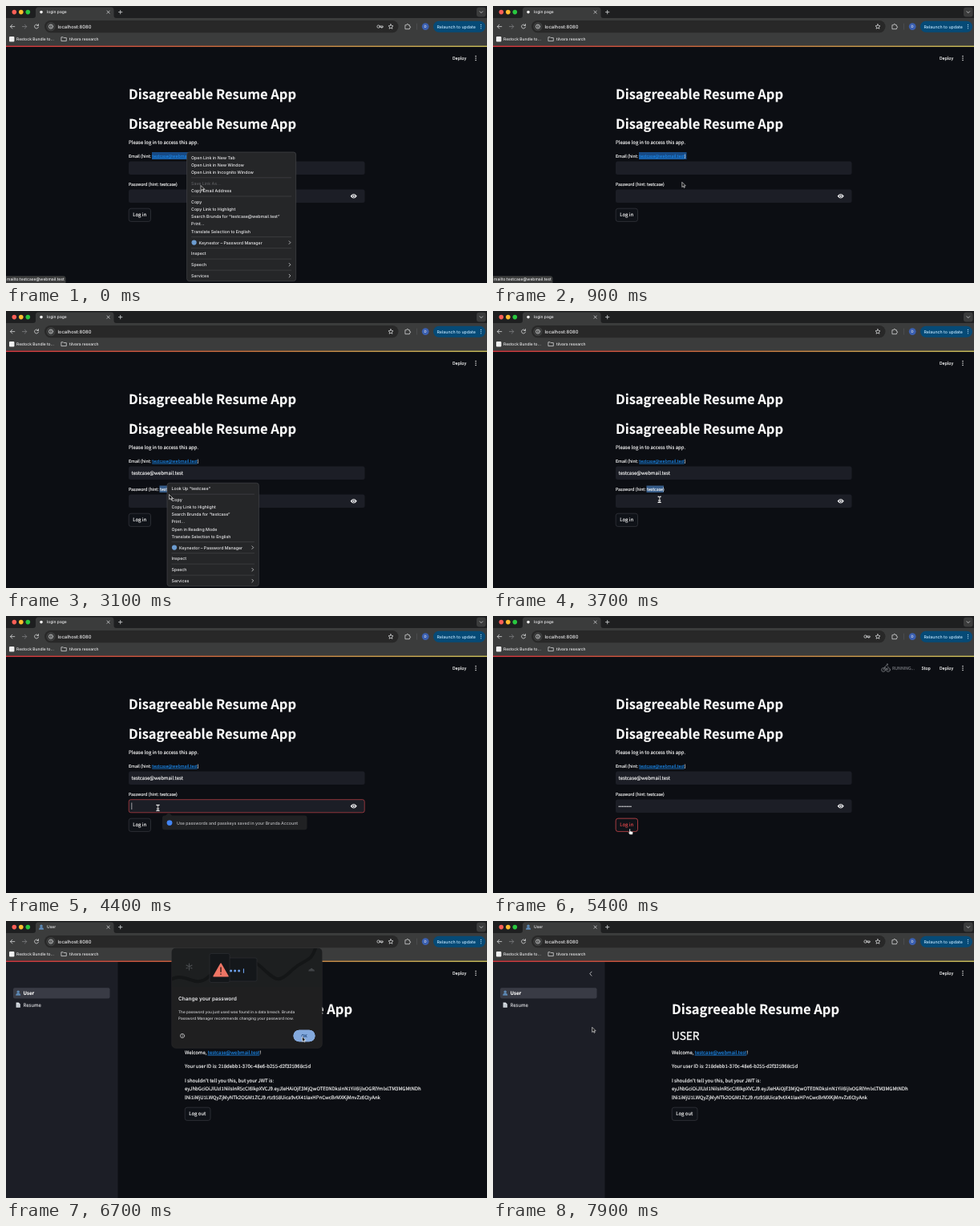
Recreate the animation shown at these times as an HTML page. Size 600 px wide and 345 px high, loop 8 s.

```html
<!DOCTYPE html>
<html lang="en">
<head>
<meta charset="utf-8">
<title>Login demo</title>
<style>
html, body { margin: 0; width: 100%; height: 100%; overflow: hidden; background: #0c0e13; }
svg { display: block; width: 600px; height: 345px; }
text { font: 500 5.25px Inter, sans-serif; color: #ececee; fill: currentColor; white-space: pre; text-rendering: geometricPrecision; }
.app text { font: 6.01px "Noto Sans CJK JP", "Noto Sans CJK SC", "Noto Sans CJK", sans-serif; color: #fafafa; stroke: currentColor; stroke-width: .14; }
.app .title { font-size: 16.45px; font-weight: 700; }
.app .sub { font-size: 13.6px; stroke-width: .4; }
.app .small { font-size: 5.25px; }
.app .note { font-size: 4.4px; color: #94959b; }
.app .link { color: #1c83e1; text-decoration: underline; }
.tab { font-size: 4.95px; }
.line { fill: none; stroke: #d2d3d5; stroke-width: .8; stroke-linecap: round; stroke-linejoin: round; }
.field { fill: #1c1e26; }
.focus { fill: none; stroke: #c23f47; stroke-width: .7; }
.button { fill: #0f1218; stroke: #383a41; stroke-width: .7; }
.caret { stroke: #f6f6f8; stroke-width: .6; }
</style>
</head>
<body>
<svg viewBox="0 0 600 345">
  <defs>
    <linearGradient id="stripe"><stop stop-color="#e23c44"/><stop offset=".5" stop-color="#d67a42"/><stop offset="1" stop-color="#d6cb62"/></linearGradient>
    <clipPath id="banner"><path d="M207 82V39q0-5 5-5H389q5 0 5 5V82z"/></clipPath>
    <g id="person"><circle r="1.7" cy="-1.3"/><path d="M-3 3.2q0-3 3-3t3 3z"/></g>
  </defs>

  <!-- Page -->
  <rect width="600" height="345" fill="#0c0e13"/>
  <g class="app">
    <text class="small" x="557" y="67">Deploy</text>
    <g fill="#eee"><circle cx="586" cy="62.6" r=".75"/><circle cx="586" cy="65.1" r=".75"/><circle cx="586" cy="67.6" r=".75"/></g>
    <g data-on="5300-5600">
      <g class="line" style="stroke:#7d7f84">
        <circle cx="487" cy="67" r="2.4"/><circle cx="493" cy="67" r="2.4"/>
        <path d="M487 67l1.7-3.5 2.2 2.6 2.1.9M488.7 63.5l2.3-2.2 2 2"/><circle cx="491.8" cy="60.2" r=".6"/>
      </g>
      <text class="small" x="498" y="67" style="color:#77797f">RUNNING...</text>
      <text class="small" x="534.5" y="67">Stop</text>
    </g>

    <g data-on="0-5600">
      <text class="title" x="153" y="115.7">Disagreeable Resume App</text>
      <text class="title" x="153" y="152.9">Disagreeable Resume App</text>
      <text x="153" y="171.7">Please log in to access this app.</text>
      <rect data-on="0-1300" x="182" y="182" width="59.5" height="9" fill="#174a85"/>
      <text class="small" x="153" y="188.8">Email (hint: <tspan class="link">testcase@webmail.test</tspan>)</text>
      <rect class="field" x="153" y="193.5" width="294.5" height="16.5" rx="2.5"/>
      <g data-on="1300-2400">
        <rect class="focus" x="153.2" y="193.7" width="294" height="16.1" rx="2.5"/>
        <path class="caret" data-on="1300-1500" d="M156.8 197.5v8.5"/>
        <path class="caret" data-on="1500-2400" d="M223.6 197.5v8.5"/>
        <text class="note" data-on="1500-2400" x="444.5" y="207.6" text-anchor="end">Press Enter to apply</text>
      </g>
      <text data-on="1500-5600" x="156.5" y="204">testcase@webmail.test</text>
      <rect data-on="2500-4000" x="191.5" y="217.5" width="21.5" height="8.6" fill="#355b88"/>
      <text class="small" x="153" y="223.9">Password (hint: testcase)</text>
      <rect class="field" x="153" y="228.5" width="294.5" height="16.5" rx="2.5"/>
      <g data-on="4000-5200">
        <rect class="focus" x="153.2" y="228.7" width="294" height="16.1" rx="2.5"/>
        <path class="caret" data-on="4000-4700" d="M156.8 232.5v8.5"/>
        <path class="caret" data-on="4700-5200" d="M173.6 232.5v8.5"/>
      </g>
      <path data-on="4700-5600" d="M157.4 237.2h15" fill="none" stroke="#f6f6f8" stroke-width="1.6" stroke-linecap="round" stroke-dasharray="0 2.08"/>
      <path d="M429.6 236.8q4.1-5.6 8.2 0-4.1 5.6-8.2 0z" fill="#f4f4f6"/>
      <circle cx="433.7" cy="236.8" r="1.5" fill="#f4f4f6" stroke="#1c1e26" stroke-width=".8"/>
      <rect class="button" x="153.2" y="252.2" width="27.3" height="16.2" rx="2.7"/>
      <text x="158.3" y="262.4">Log in</text>
      <g data-on="5000-5600">
        <rect class="button" x="153.2" y="252.2" width="27.3" height="16.2" rx="2.7" style="stroke:#dc4549"/>
        <text x="158.3" y="262.4" style="color:#e2484b">Log in</text>
      </g>
    </g>

    <g data-on="5600-8000">
      <rect y="51" width="139.5" height="294" fill="#1c1e26"/>
      <rect x="9" y="83.2" width="120.5" height="13.4" rx="2" fill="#393b45"/>
      <use href="#person" x="15.2" y="89.6" fill="#5d88b4"/>
      <text x="21.5" y="92" style="font-weight:700">User</text>
      <path d="M12.6 101.4h3.2l2 2v4.4h-5.2z" fill="#d7dce2"/><path d="M13.6 104.6h3M13.6 106.2h3" stroke="#8a929c" stroke-width=".5"/>
      <text x="21.5" y="107.2" style="color:#cfd0d4">Resume</text>
      <path class="line" data-on="7700-8000" d="M123 63.2l-2.2 2.5 2.2 2.5"/>
      <text class="title" x="223" y="115.7">Disagreeable Resume App</text>
      <text class="sub" x="223" y="148.4">USER</text>
      <text x="223" y="165.8">Welcome, <tspan class="link">testcase@webmail.test</tspan>!</text>
      <text x="223" y="183.3">Your user ID is: 218debb1-370c-48e6-b255-d2f325968c5d</text>
      <text x="223" y="200.7">I shouldn't tell you this, but your JWT is:</text>
      <text x="223" y="211.4">eyJhbGciOiJIUzI1NiIsInR5cCI6IkpXVCJ9.eyJleHAiOjE3MjQwOTE0NDksInN1YiI6IjIxOGRlYmIxLTM3MGMtNDh</text>
      <text x="223" y="221.9">lNi1iMjU1LWQyZjMyNTk2OGM1ZCJ9.rtz958Uica9vtX41IaxHPnCwcBrMXKjMnvZz6CtyAnk</text>
      <rect class="button" x="223.2" y="232.2" width="31.8" height="16.2" rx="2.7"/>
      <text x="228.3" y="242.4">Log out</text>
    </g>
  </g>

  <!-- Browser frame -->
  <rect width="600" height="15" fill="#1e1f20"/>
  <path d="M0 15H34q3 0 3-3V5q0-3.5 3.5-3.5H131q3.5 0 3.5 3.5v7q0 3 3 3H600V49.5H0z" fill="#3b3c3c"/>
  <rect y="49.5" width="600" height="1.4" fill="url(#stripe)"/>
  <circle cx="10.3" cy="7.6" r="2.8" fill="#ff5f57"/><circle cx="18.8" cy="7.6" r="2.8" fill="#febc2e"/><circle cx="27.3" cy="7.6" r="2.8" fill="#28c840"/>
  <g data-on="0-5600"><circle cx="44" cy="7.6" r="1.8" fill="#f2f2f2"/><text class="tab" x="51" y="9.4">login page</text></g>
  <g data-on="5600-8000"><use href="#person" x="44" y="7.6" fill="#5d88b4"/><text class="tab" x="51" y="9.4">User</text></g>
  <rect x="587" y="1.8" width="11.6" height="11.6" rx="3" fill="#3b3c3c"/>
  <path class="line" d="M126 6l3.2 3.2M129.2 6L126 9.2M142.7 5.4v4.4M140.5 7.6h4.4M591 6.8l1.8 1.8 1.8-1.8"/>
  <rect x="48" y="18" width="441.5" height="15.2" rx="7.6" fill="#282828"/>
  <circle cx="56" cy="25.6" r="5.7" fill="#3b3c3c"/>
  <g class="line">
    <path d="M10.8 25.6H5.4M7.8 23.2l-2.4 2.4 2.4 2.4"/>
    <path d="M20.4 25.6h5.4M23.4 23.2l2.4 2.4-2.4 2.4" stroke="#7d7e80"/>
    <path d="M40.2 24.2a2.5 2.5 0 1 0 .3 2M40.5 22.6v1.9h-1.9"/>
    <circle cx="56" cy="25.6" r="2.5"/><path d="M56 25.5v1.2M56 24.3v.1"/>
    <path d="M480 22.7l.9 1.9 2.1.2-1.6 1.4.5 2.1-1.9-1.1-1.9 1.1.5-2.1-1.6-1.4 2.1-.2z"/>
    <path d="M498.3 23.7h1.5q-.1-1.3 1-1.3t1 1.3h1.6v1.6q1.2 0 1.2 1t-1.2 1v1.4h-5.1z"/>
    <path d="M512.5 22v7.2" stroke="#57585a" stroke-width=".6"/>
    <g data-on="0-600 5300-8000"><circle cx="464.6" cy="25.6" r="1.7"/><path d="M466.4 25h3.8v1.4h-3.8M468.8 26.6v.9"/></g>
  </g>
  <text x="64.4" y="27.7" style="font-size:5.85px">localhost:8080</text>
  <circle cx="523.2" cy="25.6" r="4.4" fill="#3a5fb0"/><text x="523.2" y="27.2" text-anchor="middle" style="font-size:4.4px">D</text>
  <rect x="533" y="18.7" width="65" height="14" rx="7" fill="#064a76"/>
  <text x="537.5" y="27.5" style="color:#c2e7ff">Relaunch to update</text>
  <g fill="#c2e7ff"><circle cx="592.5" cy="23.4" r=".6"/><circle cx="592.5" cy="25.6" r=".6"/><circle cx="592.5" cy="27.8" r=".6"/></g>
  <rect x="4" y="38" width="6.4" height="6.4" rx="1" fill="#f0f0f0"/>
  <text class="tab" x="13" y="42.8">Restock Bundle to...</text>
  <path class="line" d="M69.3 38.8h2l.8.8h3.2v4h-6z"/>
  <text class="tab" x="79" y="42.8">tilvara research</text>

  <g data-on="0-1100">
    <path d="M0 336.3H71.5q3 0 3 3V345H0z" fill="#3b3c3c"/>
    <text x="1" y="342.2" style="font-size:5px">mailto:testcase@webmail.test</text>
  </g>

  <g id="linkMenu" data-on="0-600"></g>
  <g id="textMenu" data-on="2800-3500"></g>

  <g data-on="4100-4700">
    <path d="M199 248.5l4-3.6 4 3.6H372.5q3 0 3 3v11.8q0 3-3 3H198q-3 0-3-3v-11.8q0-3 3-3z" fill="#202123"/>
    <circle cx="204" cy="257.6" r="3.4" fill="#4285f4"/>
    <text x="213" y="259.5" style="color:#b9babd">Use passwords and passkeys saved in your Brunda Account</text>
  </g>

  <!-- Password warning -->
  <g data-on="6000-6900">
    <rect x="206.7" y="33.7" width="187.6" height="124.6" rx="5" fill="#1f1f20" stroke="#2e2f31" stroke-width=".5"/>
    <g clip-path="url(#banner)">
      <rect x="207" y="34" width="187" height="48" fill="#1d1f20"/>
      <path d="M200 77C222 58 234 86 252 70S298 38 318 57s22 20 39 4 23-7 30-30" fill="none" stroke="#141617" stroke-width="4"/>
      <g fill="#14171a" stroke="#34373a" stroke-width=".5">
        <rect x="277" y="46" width="36" height="29" rx="2"/>
        <rect x="254" y="40.5" width="25" height="36" rx="2"/>
      </g>
      <path d="M268 53.2l9 15.6h-18z" fill="#ee7565" stroke="#ee7565" stroke-width="1.5" stroke-linejoin="round"/>
      <path d="M268 58v5.2M268 66v.2" stroke="#2a1715" stroke-width="1.4" stroke-linecap="round"/>
      <g fill="#6ea2ee"><circle cx="280.6" cy="62" r="1.5"/><circle cx="285.6" cy="62" r="1.5"/><circle cx="290.6" cy="62" r="1.5"/><rect x="295.9" y="59.4" width="1.1" height="5.4"/></g>
      <path class="line" d="M228.5 53v8M225 55l7 4M232 55l-7 4" style="stroke:#4a4d50;stroke-width:1.1"/>
      <path d="M377.3 62.5q0-2.7 2.2-2.5 1.6-2.4 3.3 0 2.2-.1 2.2 2.5z" fill="#424548"/>
    </g>
    <text x="215" y="99.4" style="font-size:6.5px;font-weight:600">Change your password</text>
    <text x="215" y="114.9" style="font-size:4.75px;color:#cfd0d3">The password you just used was found in a data breach. Brunda</text>
    <text x="215" y="122.8" style="font-size:4.75px;color:#cfd0d3">Password Manager recommends changing your password now.</text>
    <g class="line" style="stroke-width:.7"><circle cx="220" cy="143" r="2.6"/><path d="M220 142.8v1.4M220 141.5v.1"/></g>
    <rect x="358.5" y="135.7" width="27" height="14.6" rx="7.3" fill="#a8c7fa"/>
    <rect data-on="6300-6900" x="358.5" y="135.7" width="27" height="14.6" rx="7.3" fill="#83a9dd"/>
    <text x="372" y="144.9" text-anchor="middle" style="color:#0b3266">OK</text>
  </g>

  <g id="cursor">
    <path data-on="0-1100 2700-3700 5600-8000" d="M0 0v6.2l1.5-1.3 1 2.1 1-.5-1-2h2z" fill="#111" stroke="#fff" stroke-width=".6"/>
    <g data-on="1100-2700 3700-4900" fill="none" stroke-linecap="round">
      <path d="M-1.5-3.6Q0-3.6 0-2.6V2.6Q0 3.6-1.5 3.6M1.5-3.6Q0-3.6 0-2.6M0 2.6Q0 3.6 1.5 3.6M-.9 1.2H.9" stroke="#fff" stroke-width="1.3"/>
      <path d="M0-3V3" stroke="#222" stroke-width=".5"/>
    </g>
    <path data-on="4900-5600" d="M-.5 0q.7-.8 1.3 0v2.5l2.6.6q.9.3.8 1.3l-.6 2.5H.1l-2.1-2.8q.3-.9 1.5 0z" fill="#fff" stroke="#111" stroke-width=".5"/>
  </g>
</svg>
<script>
const $ = id => document.getElementById(id);

// A menu entry is [label, centre y]; entries without a label are separators.
const services = [
  ['', 287.6], ['Keynestor – Password Manager', 294.6], ['', 301.6], ['Inspect', 308.2],
  ['', 315.1], ['Speech', 322.2], ['', 329.1], ['Services', 336]
];

function buildMenu(id, x, y, width, hover, items) {
  let out = `<rect x="${x}" y="${y}" width="${width}" height="${342.6 - y}" rx="3" fill="#252628" stroke="#4b4c4f" stroke-width=".6"/>
    <rect data-on="${hover.on}" x="${x + 2.5}" y="${hover.y - 4.6}" width="${width - 5}" height="9.2" rx="2" fill="#2f64b8"/>`;
  for (const [label, cy] of [...items, ...services]) {
    if (!label) {
      out += `<path d="M${x + 5.5} ${cy}H${x + width - 5.5}" stroke="#48494c" stroke-width=".6"/>`;
      continue;
    }
    const icon = label.startsWith('Keynestor');
    if (icon) out += `<circle cx="${x + 9}" cy="${cy}" r="3.1" fill="#6c9cd0"/>`;
    if (icon || /^S(peech|ervices)$/.test(label))
      out += `<path class="line" d="M${x + width - 8.5} ${cy - 1.8}l1.8 1.8-1.8 1.8"/>`;
    const color = label.startsWith('Save') ? '#5c5d60' : '#ececee';
    out += `<text x="${x + (icon ? 15 : 5.5)}" y="${cy + 1.9}" style="color:${color}">${label}</text>`;
  }
  $(id).innerHTML = out;
}

buildMenu('linkMenu', 225.6, 182, 136, { on: '200-600', y: 230.2 }, [
  ['Open Link in New Tab', 188.6], ['Open Link in New Window', 197.9], ['Open Link in Incognito Window', 207.2],
  ['', 213.8], ['Save Link As...', 220.7], ['Copy Email Address', 230.2], ['', 237],
  ['Copy', 243.8], ['Copy Link to Highlight', 253], ['Search Brunda for “testcase@webmail.test”', 262.2],
  ['Print...', 271.5], ['Translate Selection to English', 280.8]
]);
buildMenu('textMenu', 201, 214.2, 114.4, { on: '3200-3500', y: 235 }, [
  ['Look Up “testcase”', 221.2], ['', 228.2], ['Copy', 235], ['Copy Link to Highlight', 244.2],
  ['Search Brunda for “testcase”', 253.4], ['Print...', 262.4], ['Open in Reading Mode', 271.6],
  ['Translate Selection to English', 280.8]
]);

// Cursor stops: time, x, y
const stops = [
  [0, 243, 223.5], [300, 252, 229], [700, 252, 229], [1200, 206, 201.7], [1900, 206, 201.7],
  [2300, 203, 222], [2800, 202, 222], [3100, 203.5, 228.5], [3300, 211, 234], [3600, 211, 234],
  [4000, 189.5, 239], [4700, 189.5, 239], [5100, 170.5, 265.4], [5600, 170.5, 265.4],
  [6300, 369.5, 144], [6900, 369.5, 144], [7300, 258, 168], [7600, 160, 170], [7900, 123.7, 132.3]
];

function cursorAt(t) {
  const next = stops.findIndex(s => s[0] > t);
  if (next < 0) return stops[stops.length - 1].slice(1);
  const [t0, x0, y0] = stops[next - 1], [t1, x1, y1] = stops[next];
  const p = (t - t0) / (t1 - t0), e = p * p * (3 - 2 * p);
  return [x0 + (x1 - x0) * e, y0 + (y1 - y0) * e];
}

const timed = [...document.querySelectorAll('[data-on]')].map(el => ({
  el, spans: el.dataset.on.split(' ').map(span => span.split('-').map(Number))
}));

function draw(now) {
  const t = Math.floor(now % 8000 / 100) * 100;
  for (const { el, spans } of timed)
    el.style.display = spans.some(([from, to]) => t >= from && t < to) ? '' : 'none';
  $('cursor').setAttribute('transform', `translate(${cursorAt(t)})`);
}

const start = performance.now();
function tick() {
  draw(performance.now() - start);
  requestAnimationFrame(tick);
}
draw(0);
requestAnimationFrame(tick);
</script>
</body>
</html>
```
